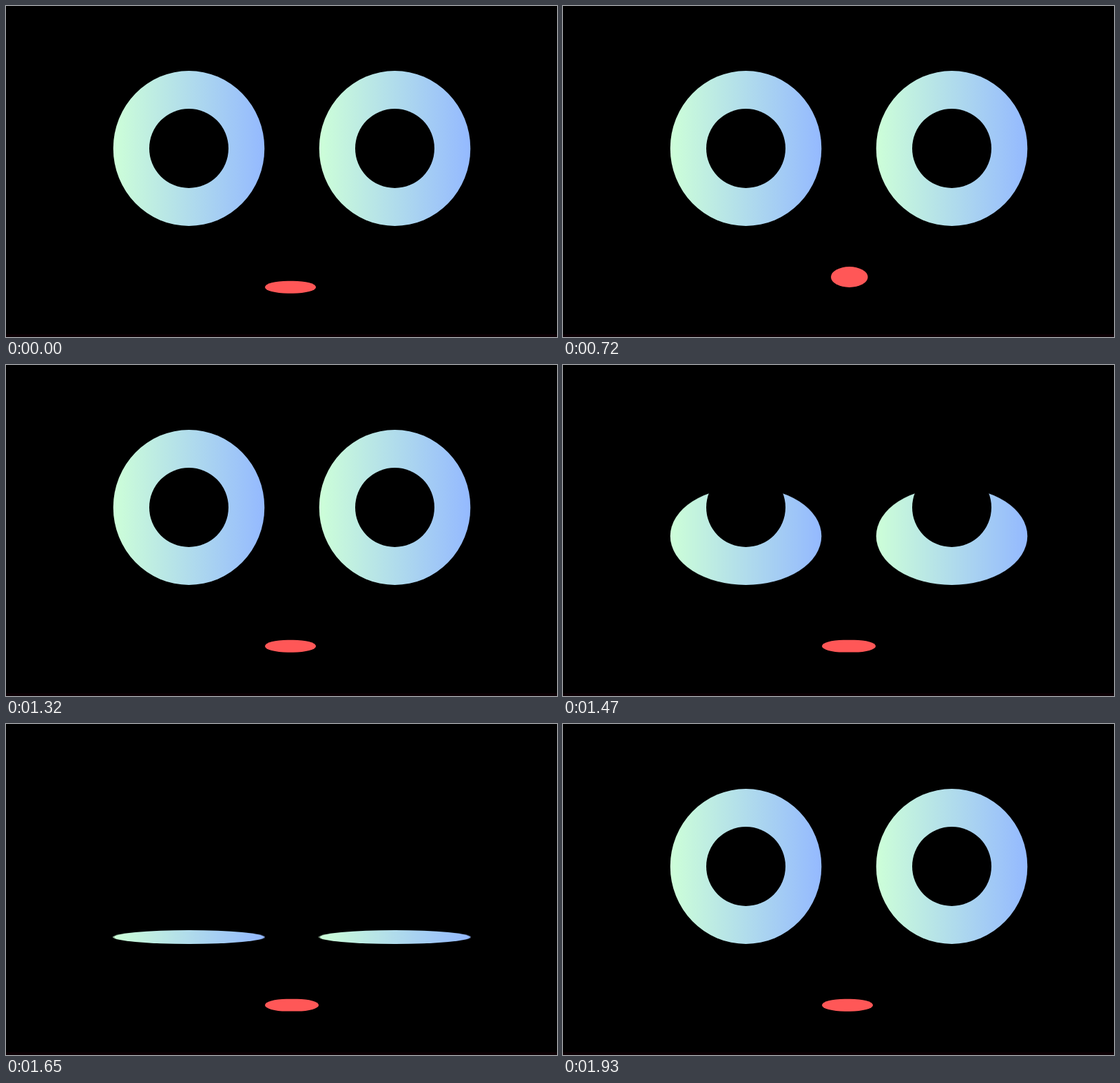
Write an HTML page without scripts that moves like this. It is 800x480 px and loops after 4.93 s.

```html
<!DOCTYPE html>
<html lang="en">
<head>
<meta charset="utf-8">
<title>Blinking face</title>
<style>
  html, body { margin: 0; width: 100%; height: 100%; overflow: hidden; background: #000; }
  svg { display: block; width: 800px; height: 480px; }

  .eyes, .mouth { animation: 4930ms step-end infinite; }

  /* Eyes squash towards their lower edge; the pupils stay put. */
  .eyes { fill: url(#iris); transform-origin: 0 319px; animation-name: blink; }
  @keyframes blink {
    0%, 39.14%     { transform: scaleY(1); }
    28.80%, 38.13% { transform: scaleY(.815); }
    29.81%, 37.11% { transform: scaleY(.631); }
    30.83%, 36.51% { transform: scaleY(.452); }
    31.84%, 35.49% { transform: scaleY(.271); }
    32.86%         { transform: scaleY(.178); }
    33.46%         { transform: scaleY(.089); }
  }

  .mouth { fill: #ff5757; animation-name: talk; }
  @keyframes talk {
    /* closed */
    0%, 26.77%, 39.14% { x: 376px; y: 398.7px; width: 74px; height: 18px; rx: 33px; ry: 9px; }
    /* wide open */
    4.05%, 11.56%, 18.66% { x: 389px; y: 369px; width: 53.6px; height: 39px; rx: 26.8px; ry: 19.5px; }
    /* half open */
    7.50%, 14.60%, 22.71% { x: 389px; y: 378px; width: 53.6px; height: 30px; rx: 26.8px; ry: 15px; }
    /* stretched during the blink */
    28.80% { x: 376px; y: 398.8px; width: 78px; height: 17.8px; rx: 31px; ry: 8.9px; }
  }
</style>
</head>
<body>
<svg viewBox="0 0 800 480">
  <defs>
    <linearGradient id="iris">
      <stop stop-color="#cdffd8"/>
      <stop offset="1" stop-color="#94b9ff"/>
    </linearGradient>
  </defs>
  <rect width="800" height="480"/>
  <rect y="476" width="800" height="4" fill="#0c0004"/>
  <g class="eyes">
    <ellipse cx="265.5" cy="206.5" rx="109.8" ry="112.5"/>
    <ellipse cx="564.5" cy="206.5" rx="109.8" ry="112.5"/>
  </g>
  <circle cx="265.5" cy="206.5" r="57.5"/>
  <circle cx="564.5" cy="206.5" r="57.5"/>
  <rect class="mouth" x="376" y="398.7" width="74" height="18" rx="33" ry="9"/>
</svg>
</body>
</html>
```
